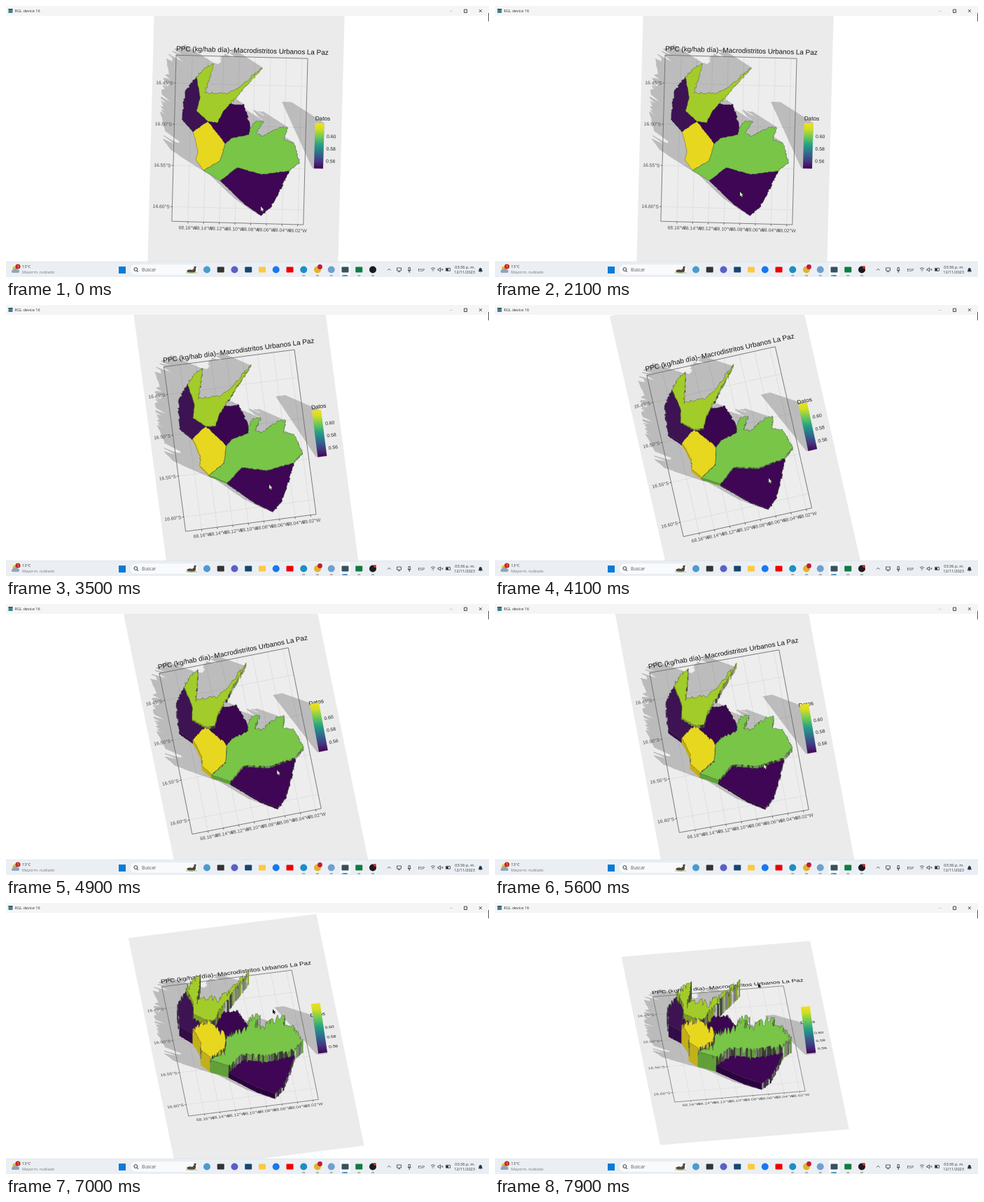
An HTML page that plays this animation: 690x388 px, repeating every 8 s.

```html
<!DOCTYPE html>
<html lang="es">
<head>
<meta charset="utf-8">
<title>RGL device 16</title>
<style>
html, body { margin: 0; width: 100%; height: 100%; overflow: hidden; background: #fff; }
svg { display: block; width: 690px; height: 388px; }
text { font-family: "Liberation Sans", Arial, sans-serif; }
.ui text { font-family: "Open Sans", "Noto Sans", sans-serif; font-size: 5.6px; fill: #333; }
#cursor { mix-blend-mode: difference; }
</style>
</head>
<body>
<svg viewBox="0 0 690 388">
  <defs>
    <clipPath id="view"><rect y="14" width="690" height="352"/></clipPath>
    <linearGradient id="viridis" x1="0" y1="0" x2="0" y2="1">
      <stop offset="0" stop-color="#f0e020"/><stop offset=".13" stop-color="#d2de22"/>
      <stop offset=".3" stop-color="#6fca55"/><stop offset=".48" stop-color="#25a085"/>
      <stop offset=".66" stop-color="#2f6c8e"/><stop offset=".83" stop-color="#453882"/>
      <stop offset="1" stop-color="#440154"/>
    </linearGradient>
  </defs>
  <rect width="690" height="388" fill="#fff"/>
  <g clip-path="url(#view)">
    <g id="ground">
      <rect x="-33" y="-95" width="272" height="426" fill="#ebebeb"/>
      <rect width="188" height="238" fill="#ededed"/>
      <g id="grid" stroke="#dcdcdc" stroke-width=".8"></g>
      <g id="shadows" opacity=".2" fill="#000" stroke="#000" stroke-width=".5"></g>
      <rect width="188" height="238" fill="none" stroke="#666" stroke-width=".8"/>
      <g id="axes" font-size="6.8" fill="#4d4d4d"></g>
      <text y="-6" font-size="9.93" fill="#111">PPC (kg/hab día)- Macrodistritos Urbanos La Paz</text>
      <text x="201" y="88" font-size="8.2" fill="#111">Datos</text>
    </g>
    <g id="relief" stroke-linejoin="round"></g>
    <path id="bar" fill="url(#viridis)"/>
    <path id="cursor" d="M0 0V6.4L1.5 5.1 2.6 7.4 3.6 6.9 2.6 4.8H4.5Z" fill="#fff"/>
  </g>
  <g class="ui">
    <rect width="690" height="14" fill="#f5f5f5"/>
    <rect x="3.5" y="4" width="6" height="6" fill="#3f7f8f"/>
    <path d="M3.5 4.5h6" stroke="#334"/>
    <text x="12.5" y="9.2">RGL device 16</text>
    <path d="M634 7.5h4" stroke="#bbb" stroke-width=".7"/>
    <path d="M654.5 5h4v4.5h-4zM675.8 5l4 4m0-4l-4 4" fill="none" stroke="#222" stroke-width=".8"/>
    <rect x="689" y="10" width="1" height="12" fill="#555"/>
    <rect y="366" width="690" height="22" fill="#ebeff3"/>
    <path d="M0 366.3h690" stroke="#d5dde4" stroke-width=".6"/>
    <circle cx="13" cy="376" r="3.6" fill="#f5b82e"/>
    <path d="M9 382a2.5 2.5 0 0 1 1-4.5 4 4 0 0 1 7 0 2.4 2.4 0 0 1 1 4.5z" fill="#8fa6bb"/>
    <circle cx="17" cy="373" r="3.6" fill="#c4281c"/>
    <text x="15.8" y="374.8" style="font-size:5px;fill:#fff">1</text>
    <text x="23" y="375.2">13°C</text>
    <text x="23" y="383" style="fill:#777">Mayorm. nublado</text>
    <rect x="161" y="373" width="10" height="10" fill="#0a7bd6"/>
    <rect x="177" y="369.5" width="98" height="16" rx="8" fill="#f8fafc" stroke="#d8dfe5" stroke-width=".5"/>
    <g fill="none" stroke="#222" stroke-width=".9"><circle cx="185.3" cy="377" r="2.4"/><path d="M187 379l2 2"/></g>
    <text x="194" y="380" style="font-size:6.4px;fill:#555">Buscar</text>
    <path d="M258 379q4-3 8-1l3-3-1-1q1-2 4-1l-1 3q1 6-5 7-6 0-8-4z" fill="#554638"/>
    <path d="M257 382h16" stroke="#b8c8a2" stroke-width="1.5"/>
    <rect x="477" y="368" width="15" height="18" rx="2" fill="#f8fbfd"/>
    <g id="icons"></g>
    <circle cx="448.5" cy="373.5" r="3.4" fill="#c4183c"/>
    <circle id="recording" cx="527" cy="374" r="2" fill="#e12222"/>
    <g fill="none" stroke="#333" stroke-width=".8">
      <path d="M545 378.5l2.3-2.3 2.3 2.3M558.5 375h6v4h-6zM560 380.5h3M575 374.5h2.4v4H575zM574 378q2.2 3.5 4.4 0M576.2 380v2"/>
      <path d="M607 376q3-2.4 6 0M608.3 378q1.7-1.4 3.4 0M610 379.5v.8M617 376.4h1.5l2-1.6v5.4l-2-1.7H617zM622.2 376.2l2 2.4m0-2.4l-2 2.4M628.5 375.3h6v4h-6z"/>
    </g>
    <rect x="629" y="376" width="3" height="3" fill="#333"/>
    <text x="588.5" y="379.5">ESP</text>
    <text x="670" y="375.5" text-anchor="end">03:36 p. m.</text>
    <text x="670" y="383" text-anchor="end">12/11/2023</text>
    <path d="M675 380q1-1 1-3a1.8 1.8 0 0 1 3.6 0q0 2 1 3zM677 381h1.6" fill="#234" stroke="#234" stroke-width=".5"/>
  </g>
</svg>
<script>
const $ = id => document.getElementById(id);
const add = (parent, tag, attrs, text) => {
  const el = document.createElementNS('http://www.w3.org/2000/svg', tag);
  for (const k in attrs) el.setAttribute(k, attrs[k]);
  if (text) el.textContent = text;
  return parent.appendChild(el);
};
let seed = 7;
const rand = () => (seed = seed * 16807 % 2147483647) / 2147483647;
const poly = pts => 'M' + pts.map(p => p[0].toFixed(2) + ' ' + p[1].toFixed(2)).join('L') + 'Z';
const pairs = list => list.map((p, i) => [p, list[(i + 1) % list.length]]);

// Corners where borders meet or turn, in screen pixels of the opening view
const corners = {};
('A297,82 B284,124 C313,125 D331,118 E366,88 F344,113 G320,140 H310,151 I302,167 J288,165 K272,150 L277,130 ' +
 'M272,101 N285,88 O256,121 P251,162 Q267,180 R304,185 S313,197 T306,221 U282,235 V271,220 W274,208 X270,190 ' +
 'b340,141 c344,154 d349,174 e347,184 f322,189 g357,164 h368,165 i357,181 j366,186 k392,173 l402,174 m397,191 ' +
 'n411,196 o419,223 p404,236 q365,241 r330,231 s306,250 t389,268 u376,290 v364,300 w340,283')
  .split(' ').forEach(s => {
    const [x, y] = s.slice(1).split(',').map(Number);
    corners[s[0]] = [x - 243 + .0266 * (y - 70), y - 70 - .0266 * (x - 243)];
  });

// Back to front, corners clockwise
const districts = [
  { outline: 'ABCDEFGHIJKLMN', height: 32, color: '#a2cc29', wall: '#839f28' },
  { outline: 'MLKJQPO', height: 23, color: '#3d1354', wall: '#35104a' },
  { outline: 'GbcdefSRJIH', height: 12, color: '#3a0650', wall: '#2f0541' },
  { outline: 'JRSTUVWXQ', height: 35, color: '#e8d71f', wall: '#c4b11e' },
  { outline: 'SfedghijklmnopqrsUT', height: 28, color: '#79c548', wall: '#64a13b' },
  { outline: 'srqptuvw', height: 12, color: '#3e0654', wall: '#2f0541' }
];
const sides = districts.flatMap(d => pairs([...d.outline]).map(e => e.join('')));
const isShared = (a, b) => sides.includes(b + a);
const isSmooth = (a, b) => {
  const dx = corners[b][0] - corners[a][0], dy = corners[b][1] - corners[a][1];
  return dx < 0 && dy < .5 * dx;
};

// A ragged line between two corners; neighbours reuse it reversed
const borders = {};
function border(a, b) {
  if (borders[b + a]) return [...borders[b + a]].reverse();
  const [x, y] = corners[a], [x2, y2] = corners[b];
  const n = Math.ceil(Math.hypot(x2 - x, y2 - y) / 1.7);
  const amp = isShared(a, b) || isSmooth(a, b) ? .9 : 2.4;
  const wobble = k => k % n ? (rand() - .5) * amp : 0;
  return borders[a + b] = Array.from({ length: n + 1 }, (_, k) =>
    [x + (x2 - x) * k / n + wobble(k), y + (y2 - y) * k / n + wobble(k)]);
}

const cast = ([u, v, h]) => [u - 1.36 * h, v - .82 * h];
function addShadow(pts) {
  const bands = pairs(pts).map(([a, b]) => poly([a, b, cast(b), cast(a)]));
  [...bands, poly(pts.map(cast))].forEach(d => add($('shadows'), 'path', { d }));
}

for (const d of districts) {
  const layer = fill => ({ el: add($('relief'), 'path', { fill, stroke: fill, 'stroke-width': .3 }), pieces: [] });
  d.walls = [layer(d.wall), layer('#7c8078'), layer('#3a3f34')];
  d.points = [];
  for (const [a, b] of pairs([...d.outline])) {
    const smooth = isSmooth(a, b), gap = isShared(a, b) ? 0 : .35;
    // Rough rims dip at random, which shows as spikes once tilted
    const line = border(a, b).map(p => [...p, d.height * (smooth ? 1 : 1 - .5 * rand() ** 3)]);
    d.points.push(...line.slice(0, -1));
    for (let i = 1; i < line.length; i++) {
      if (line[i][0] > line[i - 1][0]) continue;
      const r = smooth ? 1 : rand();
      if (r < gap) continue;
      const shade = r > .65 ? 0 : r > .48 ? 1 : 2;
      d.walls[shade].pieces.push([line[i - 1], line[i]]);
    }
  }
  addShadow(d.points);
  d.top = add($('relief'), 'path', { fill: d.color, stroke: '#333a2c', 'stroke-width': .5, 'stroke-opacity': .75 });
}
const barPoints = [[201, 92, 35], [214, 92, 35], [214, 157, 2], [201, 157, 2]];
addShadow(barPoints);

for (let i = 0; i < 8; i++) {
  const x = 23 + i * 22.43;
  add($('grid'), 'path', { d: `M${x} 0V238` });
  add($('axes'), 'path', { d: `M${x} 238v2.5`, stroke: '#444', 'stroke-width': .7 });
  add($('axes'), 'text', { x, y: 249, 'text-anchor': 'middle' }, `68.${String(16 - 2 * i).padStart(2, '0')}°W`);
}
for (let i = 0; i < 4; i++) {
  const y = 40 + i * 59;
  add($('grid'), 'path', { d: `M0 ${y}H188` });
  add($('axes'), 'path', { d: `M-2.5 ${y}h2.5`, stroke: '#444', 'stroke-width': .7 });
  add($('axes'), 'text', { x: -3.5, y: y + 2.4, 'text-anchor': 'end' }, `16.${45 + 5 * i}°S`);
}
for (let i = 0; i < 3; i++)
  add($('axes'), 'text', { x: 218, y: 113 + i * 17.7, fill: '#222' }, `0.${60 - 2 * i}`);

// o: round, s: square; an underscore marks a running program
'o#4a9bd0 s#333333 o#5b5fc7 s#17466e s#fcc93f o#1877f2 s#f00000 o#1c8fc4_ o#e0b32c_ o#6f9fd0_ s#39515c_ s#107c41_ o#1b1b1f_'
  .split(' ').forEach((icon, i) => {
    const x = 287 + 19.75 * i, fill = icon.slice(1, 8);
    if (icon[0] === 'o') add($('icons'), 'circle', { cx: x, cy: 377.5, r: 5, fill });
    else add($('icons'), 'rect', { x: x - 5, y: 373.5, width: 10, height: 8, rx: 1, fill });
    if (icon.endsWith('_')) add($('icons'), 'path', { d: `M${x - 2} 386h4`, stroke: '#888', 'stroke-width': 1.2 });
  });
add($('icons'), 'path', { d: 'M480 386h8', stroke: '#1676c8', 'stroke-width': 1.2 });

// Pointer moves: start, end, dx, dy. The first only hovers, the others drag the scene.
const hover = [100, 800, -14, -21];
const drags = [
  [2100, 2600, 11, 0], [2900, 4100, 30, -18], [4100, 5600, -7, -19],
  [5600, 7000, -3, -77], [7000, 7900, -5, -37]
];
const travel = (moves, t) => moves.reduce(([x, y], [start, end, dx, dy]) => {
  const f = Math.min(1, Math.max(0, (t - start) / (end - start)));
  return [x + dx * f, y + dy * f];
}, [0, 0]);

const pivot = { x: 345, y: 190, u: 105, v: 117, h: 12.5 };
const rad = Math.PI / 180;

function draw(t) {
  const [hx, hy] = travel([hover], t), [dx, dy] = travel(drags, t);
  const yaw = (1.5 - .346 * dx) * rad, tilt = -dy / 3 * rad;
  const cos = Math.cos(yaw), sin = Math.sin(yaw), flat = Math.cos(tilt), lift = Math.sin(tilt);
  const project = ([u, v, h]) => {
    const a = u - pivot.u, b = v - pivot.v;
    return [pivot.x + cos * a - sin * b, pivot.y + (sin * a + cos * b) * flat - (h - pivot.h) * lift];
  };
  const base = ([u, v]) => project([u, v, 0]);
  $('ground').setAttribute('transform', `matrix(${[cos, sin * flat, -sin, cos * flat, ...base([0, 0])]})`);
  for (const d of districts) {
    for (const w of d.walls)
      w.el.setAttribute('d', lift > 0 ? w.pieces.map(([a, b]) => poly([project(a), project(b), base(b), base(a)])).join('') : '');
    d.top.setAttribute('d', poly(d.points.map(project)));
  }
  $('bar').setAttribute('d', poly(barPoints.map(project)));
  $('cursor').setAttribute('transform', `translate(${364 + hx + dx} ${287 + hy + dy})`);
  $('recording').setAttribute('visibility', t >= 700 ? 'visible' : 'hidden');
}

let start, shown;
function tick(now) {
  start ??= now;
  const t = Math.floor((now - start) % 8000 / 100) * 100;
  if (t !== shown) draw(shown = t);
  requestAnimationFrame(tick);
}
draw(0);
requestAnimationFrame(tick);
</script>
</body>
</html>
```
